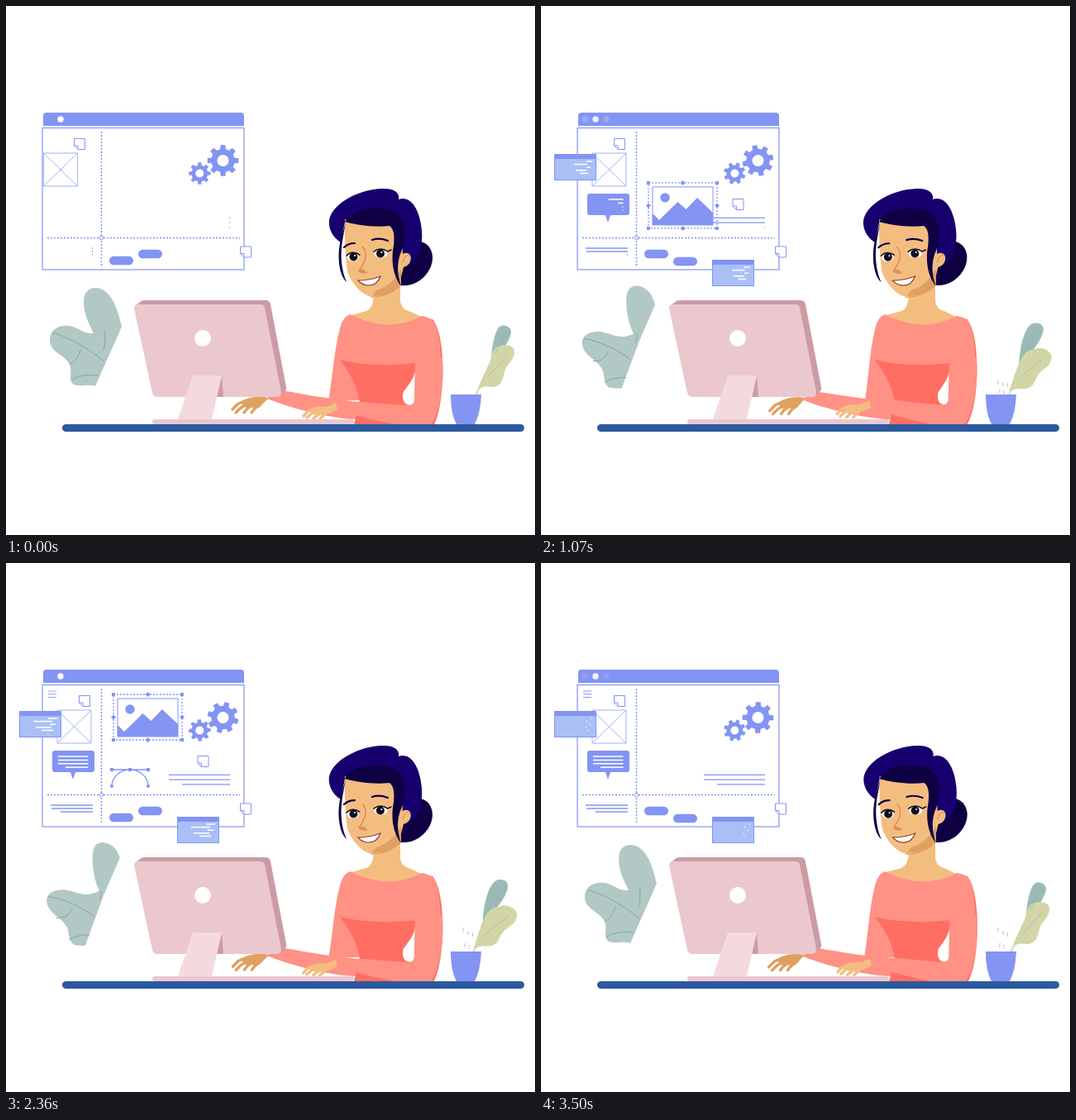
Write an HTML page that moves like this. It is 640 by 640 pixels and loops after 3570 ms.

```html
<!DOCTYPE html>
<html lang="en">
<head>
<meta charset="utf-8">
<title>Designer at work</title>
<style>
  html, body { margin: 0; width: 100%; height: 100%; overflow: hidden; background: #fff; }
  svg { display: block; width: 100%; height: 100%; }
  .line { fill: none; stroke: #8394f3; }
  .pale { stroke: #a3b2f6; }
  .blue { fill: #8394f3; }
  .dots { stroke-dasharray: 2 2; }
  .skin { fill: #f4bd80; }
  .tan { fill: #e0a05f; }
  .hair { fill: #17006e; }
  .dark { fill: #0e0043; }
  .dress { fill: #ff9185; }
  .red { fill: #ff6e62; }
  .pink { fill: #eac8ce; }
  .rose { fill: #cc9ba5; }
  .fingers { fill: none; stroke-width: 3.4; stroke-linecap: round; stroke-linejoin: round; }
  .vein { fill: none; stroke: #7fa3b8; }
</style>
</head>
<body>
<svg viewBox="0 0 640 640">
  <defs>
    <g id="note" stroke="#8394f3" fill="#fff">
      <path d="M.5 .5H13.5V13.5H5L.5 9Z"/>
      <path d="M.5 9H5V13.5" fill="none"/>
    </g>
    <g id="panel">
      <rect x="16.5" y="179.5" width="50" height="31" fill="#a9bff5" stroke="#8394f3"/>
      <path class="blue" d="M16 179h51v6h-51z"/>
    </g>
  </defs>

  <!-- browser window -->
  <path class="blue" d="M45 145V133Q45 129 49 129H284Q288 129 288 133V145Z"/>
  <g fill="#fff">
    <circle class="outer" cx="53" cy="137" r="3.7"/>
    <circle id="middle" cx="66" cy="137" r="3.7"/>
    <circle class="outer" cx="79" cy="137" r="3.7"/>
  </g>
  <rect class="line" x="44" y="147.5" width="244" height="171.5" stroke-width="1.2"/>
  <path class="line dots" stroke-width="1.5" d="M115.5 152V314M50 280.5H283"/>
  <circle cx="115.5" cy="280.5" r="2.2" fill="#fff" stroke="#8394f3"/>
  <path id="menu" class="line" d="M51 155H61M51 158.5H61M51 162.5H61"/>
  <path id="cross" class="line pale" d="M45.5 178H86.5V218H45.5ZL86.5 218M86.5 178L45.5 218"/>
  <use id="sideNote" href="#note" y="160"/>
  <use href="#note" x="283" y="290.5"/>
  <use id="midNote" href="#note" x="231.5" y="233"/>
  <path id="bigGear" class="blue" fill-rule="evenodd"/>
  <path id="smallGear" class="blue" fill-rule="evenodd"/>
  <rect id="pill1" class="blue" x="125" width="29" height="10.5" rx="5.2"/>
  <rect id="pill2" class="blue" x="160" width="29" height="10.5" rx="5.2"/>
  <g id="text" stroke="#8394f3" stroke-width="1.3"></g>
  <g id="arch">
    <path class="line" stroke-width="1.3" d="M128 250H172M128 270A22 20 0 0 1 172 270"/>
    <path class="blue" d="M126 248h4v4h-4zM148 248h4v4h-4zM170 248h4v4h-4z"/>
    <circle class="blue" cx="128" cy="270" r="2"/><circle class="blue" cx="172" cy="270" r="2"/>
  </g>
  <g id="picture">
    <rect class="line dots" x="130" y="219" width="83" height="55" stroke-width="1.3"/>
    <path class="blue" d="M128 217h4v4h-4zM211 217h4v4h-4zM128 272h4v4h-4zM211 272h4v4h-4z
      M171.5 216l3 3-3 3-3-3zM171.5 271l3 3-3 3-3-3zM130 243.5l3 3-3 3-3-3zM213 243.5l3 3-3 3-3-3z"/>
    <rect class="line" x="135" y="224" width="73" height="46"/>
    <circle class="blue" cx="150" cy="237" r="5.7"/>
    <path class="blue" d="M135 256L143 264 165.500 242 175.500 251 189 237 208 255V270H135Z"/>
  </g>
  <g id="bubble">
    <path class="blue" d="M59 227H104Q107 227 107 230V250Q107 253 104 253H84L81 262 78 253H59Q56 253 56 250V230Q56 227 59 227Z"/>
  </g>
  <g class="panel"><use href="#panel"/></g>
  <g class="panel" transform="translate(191 128)"><use href="#panel"/></g>

  <!-- plants -->
  <path class="slow" fill="#b2c8c4"
    d="M108 460C98 457 92 461 82 458C74 452 81 443 77 434C72 422 54 420 53 405C53 389 67 386 77 387C90 389 92 397 106 396C100 384 94 372 94 358C94 347 99 341 109 341C127 342 135 366 140 388L124 424Z"
    data-to="M92 464C89 465 86 464 82 463C74 456 77 448 71 440C64 430 49 424 48 410C48 400 60 397 70 398C88 401 95 408 115 397C110 386 108 372 108 355C108 342 112 337 120 337C130 338 136 343 137 347L116 396Z"/>
  <path class="slow vein"
    d="M56 395C80 402 100 415 119 430M120 393C119 408 121 410 117 417M78 433C85 430 88 422 90 416M80 452C90 446 100 446 112 447"
    data-to="M49 406C70 408 90 418 103 427M114 398C114 401 113 402 112 404M55 428C70 430 74 425 76 419M75 457C80 454 90 450 98 451"/>
  <path class="slow" fill="none" stroke="#cfcba4" stroke-width="1.5"
    d="M569 470C574 456 580 444 587 429" data-to="M565 470C568 457 571 446 576 431"/>
  <path class="slow" fill="#9bbab6"
    d="M587 430C587 415 592 388 599 387C606 385 612 390 611 396C608 408 598 420 587 430"
    data-to="M574 434C574 415 582 383 595 382C604 381 607 387 606 391C604 404 590 422 574 434"/>
  <path class="slow" fill="#d2d6a6"
    d="M572 464C577 452 580 444 583 437C588 431 585 413 598 411C607 408 617 412 615 421C613 430 607 433 604 440C601 449 601 457 593 460C586 463 580 457 572 464"
    data-to="M565 469C569 457 572 445 575 434C578 422 587 417 595 418C604 412 621 420 619 430C617 441 606 442 601 448C594 454 596 461 588 463C578 467 573 461 565 469"/>
  <path class="slow vein" stroke-opacity=".45"
    d="M592 420C596 410 601 402 604 396M583 448C592 440 599 431 606 422"
    data-to="M580 422C586 410 592 401 597 393M577 452C586 442 598 436 609 429"/>
  <g id="spray" stroke="#b9bdcc"></g>
  <path class="blue" d="M538 470H575Q574 493 567 506H545Q538 493 538 470Z"/>

  <!-- woman -->
  <rect class="pink" x="177" y="500" width="244" height="6" rx="3"/>
  <path class="skin" d="M447 335H477V355Q477 367 490 370L504 377Q462 398 414 375L436 369Q444 366 445 350Z"/>
  <path class="sway tan"
    d="M318 474C302 471 291 474 283 479L290 486 306 486Z"
    data-to="M330 474C316 476 306 482 299 487L305 494 326 488Z"/>
  <path class="sway fingers" stroke="#e0a05f"
    d="M290 478L281 481 274 488M292 481L283 487 278 492M299 482L291 488 288 492M306 483L300 488 297 492"
    data-to="M306 485L297 490 290 498M308 488L299 495 294 501M315 489L307 496 304 501M322 488L315 495 313 501"/>
  <path class="sway dress"
    d="M330 465C350 467 372 473 395 475L430 480 424 500C400 500 350 489 316 475Q321 468 330 465Z"
    data-to="M330 474C350 474 372 475 400 477L430 482 425 501C390 500 360 494 325 487Q326 479 330 474Z"/>
  <path class="sway red"
    d="M421 506L428 480 480 475 494 455 496 430 515 378C526 388 530 425 528 455Q526 490 518 506Z"
    data-to="M421 506L425 478 480 475 487 455 490 430 512 378C522 388 524 425 522 455Q519 490 504 506Z"/>
  <path class="sway dress"
    d="M416 373Q462 397 503 375C515 377 520 382 522 392Q526 410 526 432L496 440 490 455 427 477 390 478C395 450 397 415 404 390Q407 377 416 373Z"
    data-to="M415 373Q462 397 503 375C513 376 517 382 518 390Q522 410 522 432L490 440 486 455 427 477 403 470C402 450 402 415 406 388Q409 377 415 373Z"/>
  <path class="sway red"
    d="M404 428Q445 438 496 432Q495 455 481 466Q478 474 484 484L428 480Q425 455 404 428Z"
    data-to="M403 428Q445 438 490 432Q490 455 481 466Q478 474 482 482L428 476Q423 455 403 428Z"/>
  <path class="sway" fill="#fff"
    d="M495 440C494 455 480 462 480 474Q481 483 490 483L495 481Z"
    data-to="M490 440C488 455 481 464 480 474Q481 480 482 480L487 477Z"/>
  <path class="sway dress"
    d="M495 425L528 425C530 455 526 490 515 506H472C445 502 420 494 399 489L400 478C430 478 460 482 487 483Q494 483 494 476Z"
    data-to="M490 425L522 425C524 455 517 496 501 506H470C440 494 415 484 389 476L388 465C420 461 445 477 476 481Q484 482 486 472Z"/>
  <path class="sway skin"
    d="M399 480L388 485C378 484 370 485 365 490L374 495 392 493 401 488Z"
    data-to="M390 464L374 467C365 468 358 471 353 475L362 482 378 478 390 474Z"/>
  <path class="sway fingers" stroke="#f4bd80"
    d="M376 487L366 490 360 496M380 490L370 493 364 498M386 491L377 495 372 499M390 490L385 495 380 499"
    data-to="M364 472L354 475 348 482M368 474L358 479 352 488M374 475L365 482 358 490M380 474L373 482 367 490"/>

  <g id="head">
    <path class="dark" d="M478 338C500 340 517 320 516 303C515 292 508 286 501 285L478 300Z"/>
    <path class="hair" d="M405 286C394 279 390 268 391 259C394 240 425 222 455 221C469 220 477 226 475 234C490 229 499 246 502 264C505 280 503 298 494 309L478 306V262H410Z"/>
    <path class="tan" d="M440 352Q463 347 478 325L478 338Q466 351 444 353Z"/>
    <path class="skin" d="M410 258L478 262 480 300C492 294 494 313 481 316L478 328C473 340 458 350 445 352C432 352 418 336 413 321Q409 292 410 258Z"/>
    <path class="tan" d="M478 318Q468 338 448 344L443 351Q468 349 478 333Z"/>
    <path d="M480 311Q482 300 488 302" fill="none" stroke="#d98b52"/>
    <path class="dark" d="M410 261C418 246 440 243 462 246C474 249 480 256 482 270C483 284 480 294 477 300C473 312 473 324 478 339C467 325 466 305 469 290C470 280 470 270 464 266C445 268 425 265 410 261Z"/>
    <path class="dark" d="M405 282C400 303 403 326 412 334C406 320 404 303 407 284L411 262Z"/>
    <g fill="#fff">
      <ellipse cx="420" cy="304" rx="7" ry="5"/>
      <ellipse cx="453.500" cy="299.500" rx="8" ry="5"/>
    </g>
    <circle cx="420.500" cy="303.500" r="5" fill="#100c20"/>
    <circle cx="453" cy="299.500" r="5" fill="#100c20"/>
    <g fill="#fff"><circle cx="422" cy="302" r="1"/><circle cx="454.500" cy="298" r="1"/></g>
    <g fill="none" stroke="#100c20" stroke-linecap="round">
      <path stroke-width="1.500" d="M412 302Q419 295 428 301M445 297Q453 291 462 297L466 295"/>
      <path stroke="#0e0043" stroke-width="2.200" d="M409 292Q414 287 422 287M443 283Q452 280 462 284"/>
    </g>
    <path d="M431 291C439 299 434 311 427 320Q430 324 437 322" fill="none" stroke="#d9854f" stroke-width="1.300"/>
    <path d="M427 320Q432 316 437 323Q430 325 427 320Z" fill="#e08f5a"/>
    <path d="M426 332Q440 332 453 327Q449 338 439 338Q431 338 426 332Z" fill="#fff" stroke="#8c3f2c" stroke-width="1.200"/>
  </g>

  <!-- computer and desk -->
  <path class="rose" d="M156 363L163 357.500Q164 356 168 356H314Q319 356 320 361L339 461Q340 465 337 467L330 473 310 363Z"/>
  <path class="pink" d="M155 366Q155 361 160 361H308Q312 361 313 365L333 467Q333 473 328 473H183Q178 473 177 468Z"/>
  <path class="rose" d="M261 447L263 473H255Z"/>
  <path fill="#f4dadf" d="M226 447H261L249 500H208Z"/>
  <circle cx="238" cy="402" r="10" fill="#fff"/>
  <rect x="68" y="506" width="559" height="9" rx="4.500" fill="#2c5a9f"/>
</svg>
<script>
const LOOP = 3570, BEAT = LOOP / 3;
const $ = id => document.getElementById(id);
const all = sel => [...document.querySelectorAll(sel)];
const set = (el, name, value) => el.setAttribute(name, value);
const clamp = x => Math.min(1, Math.max(0, x));
const ramp = (t, a, b) => { const u = clamp((t - a) / (b - a)); return u * u * (3 - 2 * u); };

function addLine(parent, width) {
  const el = document.createElementNS("http://www.w3.org/2000/svg", "line");
  if (width) set(el, "stroke-width", width);
  return parent.appendChild(el);
}

// Lines that grow leftwards from a fixed right end
const bars = [];
function addBar(parent, right, left, y, start, end, leave, color) {
  const el = addLine(parent, color && 1.5);
  if (color) set(el, "stroke", color);
  set(el, "x2", right); set(el, "y1", y); set(el, "y2", y);
  bars.push({ el, right, left, start, end, leave });
}
[[0, 550], [550, 1050], [1000, 2000]].forEach(([a, b], i) => {
  addBar($("text"), 105, [54, 55, 66][i], 293 + 4 * i, a, b);
  addBar($("text"), 271, [197, 197, 213][i], 256.3 + 5.8 * i, a, b);
});
[63, 63, 63, 72].forEach((left, i) =>
  addBar($("bubble"), 99.5, left, 234 + 4.4 * i, 700 + 170 * i, 1450 + 170 * i, 0, "#fff"));
for (const panel of all(".panel"))
  [[62, 51], [56, 33], [60, 53], [55, 36], [57, 43]].forEach(([right, left], i) =>
    addBar(panel, right, left, 188 + 3.6 * i, 600, 1350, 2900, "#fff"));

const drops = [[553, 27], [559, 23], [564.5, 21], [555, 8], [560, 6]]
  .map(([x, height]) => ({ x, height, el: addLine($("spray")) }));

// Shapes that blend between two poses
const morphs = all("[data-to]").map(el => {
  const from = el.getAttribute("d");
  return { el, from, to: el.dataset.to.match(/[\d.]+/g), slow: el.matches(".slow") };
});
function blend({ el, from, to }, k) {
  let i = 0;
  set(el, "d", from.replace(/[\d.]+/g, n => (+n + (to[i++] - n) * k).toFixed(2)));
}

function gear(r, hole) {
  const pts = [];
  for (let i = 0; i < 8; i++)
    for (const [turn, size] of [[-.3, .75], [-.2, 1], [.2, 1], [.3, .75]]) {
      const a = (i + turn) * Math.PI / 4;
      pts.push([r * size * Math.cos(a), r * size * Math.sin(a)].map(v => v.toFixed(2)));
    }
  return `M${pts.join("L")}ZM${-hole} 0a${hole} ${hole} 0 1 0 ${2 * hole} 0a${hole} ${hole} 0 1 0 ${-2 * hole} 0`;
}
set($("bigGear"), "d", gear(19, 7));
set($("smallGear"), "d", gear(13.3, 5));

function draw(t) {
  const phase = t % BEAT / BEAT;
  const tri = 1 - Math.abs(1 - 2 * phase);
  const sway = .7 * tri + .15 * (1 - Math.cos(2 * Math.PI * phase));
  const slow = (1 - Math.cos(2 * Math.PI * t / LOOP)) / 2;

  for (const m of morphs) blend(m, m.slow ? slow : sway);
  set($("head"), "transform", `translate(${-2 * sway}) rotate(${-2 * sway} 463 360)`);

  set($("middle"), "opacity", 1 - sway);
  for (const dot of all(".outer")) set(dot, "opacity", clamp(1.2 * sway));

  const slide = 1 - (1 - clamp(t / 1100)) ** 2;
  set($("cross"), "transform", `translate(${16.5 * slide})`);
  set($("sideNote"), "x", 82 + 6 * slide);

  const shift = (at, u) => ramp(u, at - 300, at + 300) - ramp(u, at + BEAT - 300, at + BEAT + 300);
  const u = t % (2 * BEAT);
  set($("pill1"), "y", 302.7 - 8 * shift(410, u));
  set($("pill2"), "y", 294.8 + 9 * shift(740, u));

  set($("bigGear"), "transform", `translate(262.500 187) rotate(${-45 * t / LOOP})`);
  set($("smallGear"), "transform", `translate(234.300 202.500) rotate(${65 * t / LOOP})`);

  const enter = ramp(t, 100, 500), exit = 1 - ramp(t, 2900, 3450);
  for (const el of [$("bubble"), ...all(".panel")]) set(el, "opacity", enter);
  for (const el of [$("picture"), $("midNote")]) set(el, "opacity", enter * exit);
  set($("picture"), "transform", `translate(0 ${-60 * ramp(t, 870, 1990)})`);
  set($("arch"), "opacity", ramp(t, 1230, 1680) * exit);
  set($("menu"), "opacity", ramp(t, 1150, 1550) - ramp(t, 2250, 2650) + ramp(t, 3150, 3560));

  for (const b of bars) {
    const k = ramp(t, b.start, b.end) * (b.leave ? 1 - ramp(t, b.leave, 3450) : 1);
    set(b.el, "x1", b.right - Math.max(1, (b.right - b.left) * k));
  }

  const rise = clamp((t - 250) / 1450);
  for (const { x, height, el } of drops) {
    const y = 473 - height * rise;
    set(el, "x1", x); set(el, "x2", x);
    set(el, "y1", y - 5); set(el, "y2", y);
    set(el, "opacity", clamp(rise * 8));
  }
}

function tick() {
  draw(performance.now() % LOOP);
  requestAnimationFrame(tick);
}
tick();
</script>
</body>
</html>
```
